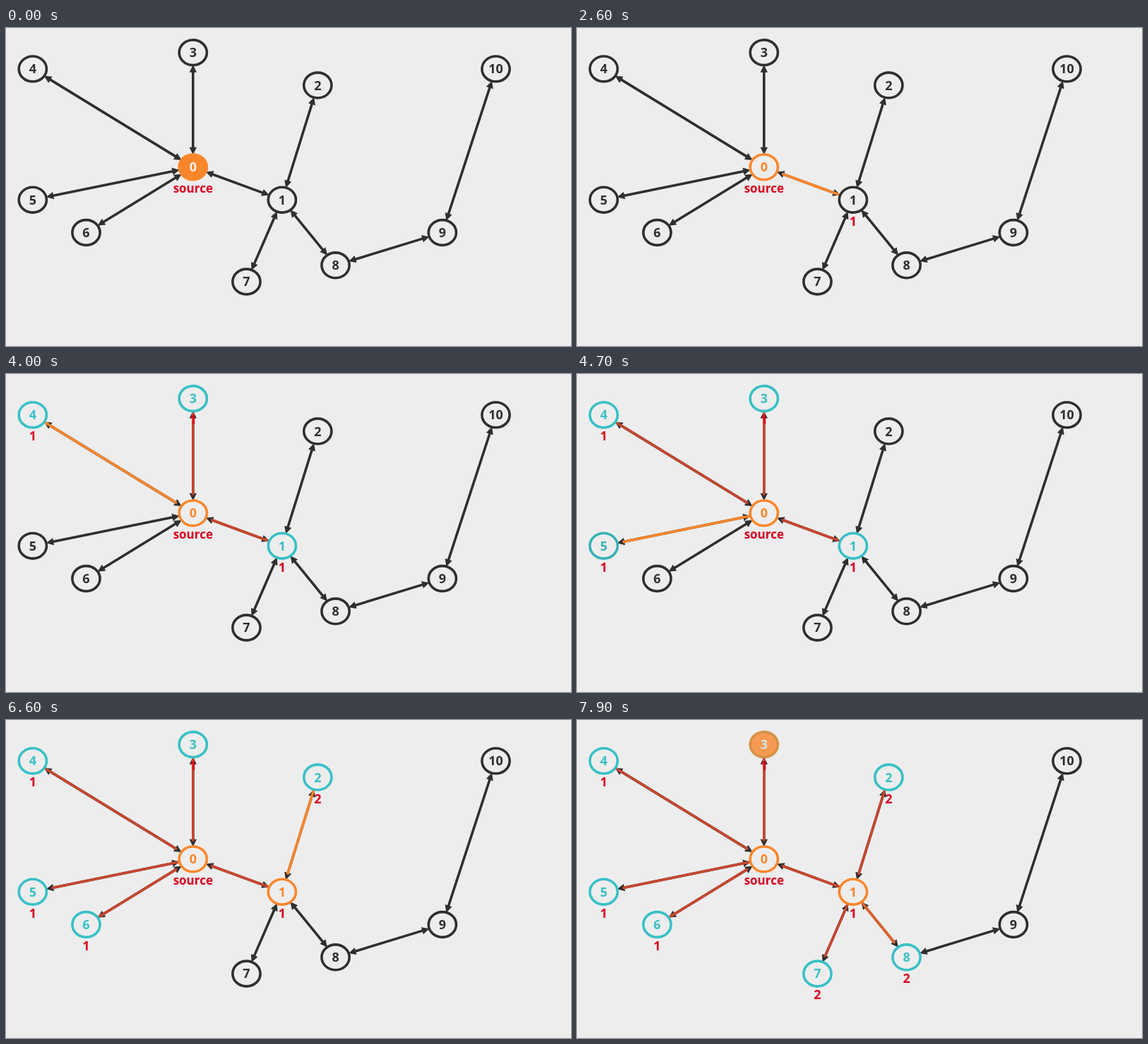
These frames come from a looping animation (800x450 px, 8000 ms). An HTML page:

```html
<!DOCTYPE html>
<html lang="en">
<head>
<meta charset="utf-8">
<title>Breadth-first search</title>
<style>
  html, body { margin: 0; width: 100%; height: 100%; overflow: hidden; background: #ededed; }
  svg { display: block; width: 100vw; height: 100vh; }
  text { font: 700 18px "Open Sans", "Noto Sans", sans-serif; text-anchor: middle; }
  line, ellipse { stroke-width: 3.6; }
  .source { font-size: 17px; }
</style>
</head>
<body>
<svg id="stage" viewBox="0 0 800 450"></svg>
<script>
const LOOP = 8000, QUICK = 90, FADE = 220;
const BG = '#ededed', DARK = '#2f2f2f', ORANGE = '#fa862b', CYAN = '#38c0c6',
      RED = '#c8472f', LABEL = '#d8001f', WHITE = '#f6f2ee';

const stage = document.getElementById('stage');

// nodes sit on a coarse grid
const nodes = [
  [21, 17], [31, 21], [35, 7], [21, 3], [3, 5], [3, 21],
  [9, 25], [27, 31], [37, 29], [49, 25], [55, 5]
].map(([col, row]) => ({ x: col * 12.61, y: row * 11.58, rim: [], fill: [], ink: [] }));

const edges = [
  [0, 1], [0, 3], [0, 4], [5, 0], [0, 6], [1, 2], [7, 1], [8, 1], [8, 9], [9, 10]
].map(([a, b]) => ({ a, b, colour: [] }));

// start of each step of the search
const times = [0, 2510, 3000, 3500, 4380, 5180, 5480, 5750, 6100, 6680, 7380, 7780];

function add(tag, attrs, text) {
  const el = document.createElementNS('http://www.w3.org/2000/svg', tag);
  for (const k in attrs) el.setAttribute(k, attrs[k]);
  if (text !== undefined) el.textContent = text;
  return stage.appendChild(el);
}

// cues: [time, duration, value]
function track(el, prop, first, cues) {
  const frames = [{ offset: 0, [prop]: first }];
  let last = first;
  for (const [t, d, value] of cues) {
    frames.push({ offset: t / LOOP, [prop]: last },
                { offset: Math.min(1, (t + d) / LOOP), [prop]: value });
    last = value;
  }
  frames.push({ offset: 1, [prop]: last });
  el.animate(frames, { duration: LOOP, iterations: Infinity });
}

// Runs the search and gives every node and edge its cues.
function search() {
  const queue = [0];
  nodes[0].depth = 0;
  let step = 0;
  for (const a of queue) {
    const node = nodes[a], t = times[step++], d = Math.min(t, 150);
    node.rim.push([t, d, ORANGE]);
    node.fill.push([t, d, ORANGE]);
    node.ink.push([t, d, WHITE]);
    if (step === times.length) return;
    node.fill.push([times[step], QUICK, BG]);
    node.ink.push([times[step], QUICK, ORANGE]);

    const links = edges.filter(e => e.a === a || e.b === a)
      .map(e => ({ edge: e, to: e.a + e.b - a }))
      .sort((p, q) => p.to - q.to);
    for (const { edge, to } of links) {
      const start = times[step++], next = nodes[to];
      edge.colour.push([start, QUICK, ORANGE], [times[step], FADE, RED]);
      if (next.depth !== undefined) continue;
      edge.start = start;
      edge.from = a;
      next.depth = node.depth + 1;
      next.start = start;
      next.rim.push([start + 140, 200, CYAN]);
      next.ink.push([start + 140, 200, CYAN]);
      queue.push(to);
    }
  }
}

// point outside the rim of p on the way to q
function port(p, q, gap) {
  const dx = q.x - p.x, dy = q.y - p.y, len = Math.hypot(dx, dy);
  const ux = dx / len, uy = dy / len;
  const r = 1 / Math.hypot(ux / 19.5, uy / 17.5) + gap;
  return { x: p.x + ux * r, y: p.y + uy * r, ux, uy };
}

function segment(p, q, attrs) {
  return add('line', { x1: p.x, y1: p.y, x2: q.x, y2: q.y, ...attrs });
}

function arrowhead(p, q) {
  const tip = port(p, q, 0), base = port(p, q, 10.5), wx = base.uy * 5.2, wy = base.ux * 5.2;
  add('path', {
    d: `M${tip.x} ${tip.y}L${base.x - wx} ${base.y + wy}L${base.x + wx} ${base.y - wy}Z`,
    fill: DARK
  });
}

function drawEdge({ a, b, start, from, colour }) {
  const p = nodes[a], q = nodes[b];
  segment(port(p, q, 5), port(q, p, 5), { stroke: DARK });
  arrowhead(p, q);
  arrowhead(q, p);
  if (start === undefined) return;
  const over = segment(port(p, q, 8), port(q, p, 1.5),
    { pathLength: 1, 'stroke-dasharray': '1 2' });
  track(over, 'strokeDashoffset', from === a ? '1.01px' : '-1.01px', [[start, QUICK, '0px']]);
  track(over, 'stroke', ORANGE, colour);
}

function drawNode({ x, y, rim, fill, ink, depth, start }, i) {
  const ring = add('ellipse', { cx: x, cy: y, rx: 19.6, ry: 17.9, fill: BG, stroke: DARK });
  const number = add('text', { x, y: y + 6.5, fill: DARK }, i);
  track(ring, 'stroke', DARK, rim);
  track(ring, 'fill', BG, fill);
  track(number, 'fill', DARK, ink);
  if (depth === 0) {
    add('text', { x, y: y + 36, fill: LABEL, class: 'source' }, 'source');
  } else if (depth) {
    const label = add('text', { x, y: y + 36.5, fill: LABEL, opacity: 0 }, depth);
    track(label, 'opacity', 0, [[start, QUICK, 1]]);
  }
}

search();
edges.forEach(drawEdge);
nodes.forEach(drawNode);
</script>
</body>
</html>
```
